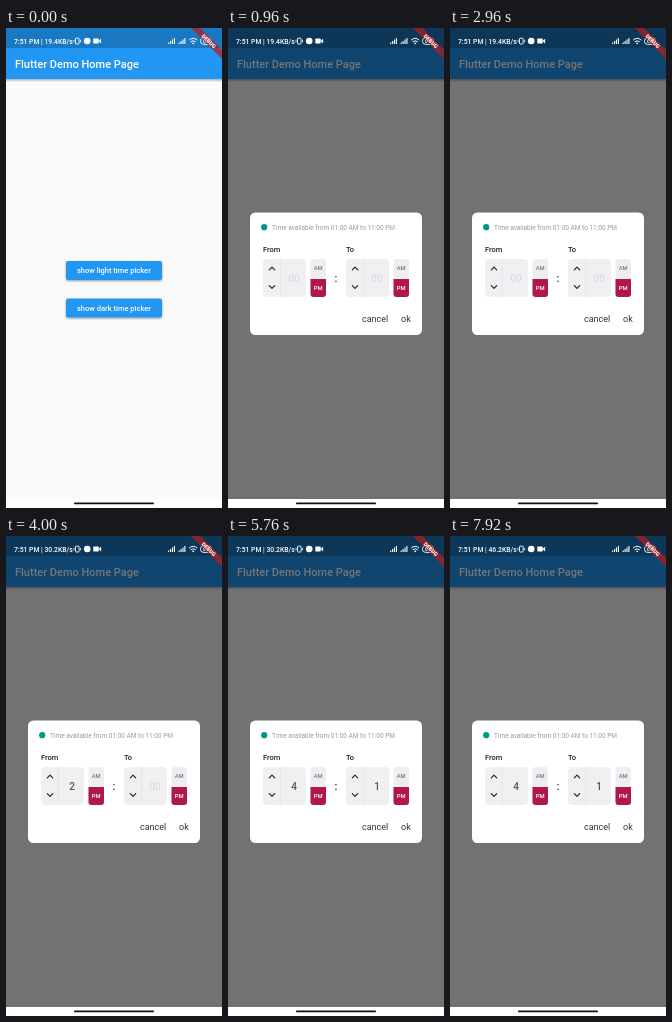
An HTML page that plays this animation: 216 px wide and 480 px high, repeating every 8000 ms.

```html
<!DOCTYPE html>
<html lang="en">
<head>
<meta charset="utf-8">
<title>Time range picker</title>
<style>
html, body { margin: 0; width: 100%; height: 100%; overflow: hidden; }
svg { display: block; width: 216px; height: 480px; font-family: Roboto, sans-serif; }
.line { fill: none; stroke-linecap: round; stroke-linejoin: round; }
.mid { text-anchor: middle; }
.medium { font-weight: 500; }
</style>
</head>
<body>
<svg viewBox="0 0 216 480">
  <defs>
    <linearGradient id="shade" x2="0" y2="1">
      <stop stop-opacity=".3"/><stop offset="1" stop-opacity="0"/>
    </linearGradient>
    <filter id="drop" x="-10%" y="-20%" width="120%" height="160%">
      <feDropShadow dx="0" dy="1" stdDeviation=".8" flood-opacity=".4"/>
    </filter>
    <g id="picker">
      <rect y="231" width="43" height="38" rx="4" fill="#f2eff3"/>
      <path d="M17.5 231v38" stroke="#e6e2e8" stroke-width=".8"/>
      <path class="line" d="M6.3 241.8l2.7-2.7 2.7 2.7M6.3 257.7l2.7 2.7 2.7-2.7" stroke="#222" stroke-width="1.2"/>
      <rect x="47.5" y="231" width="15.5" height="38" rx="3" fill="#efedf1"/>
      <path d="M47.5 251H63v15a3 3 0 0 1-3 3h-9.500a3 3 0 0 1-3-3z" fill="#b0174b"/>
      <g class="mid medium" font-size="5.8">
        <text x="55.200" y="242" fill="#777">AM</text>
        <text x="55.200" y="262" fill="#fff">PM</text>
      </g>
    </g>
    <g id="bars">
      <path d="M.7 16v-1.500M2.600 16v-3M4.500 16v-4.500M6.400 16v-6" stroke="#fff" stroke-width="1.100"/>
    </g>
  </defs>

  <rect width="216" height="480" fill="#fafafa"/>
  <rect y="51" width="216" height="3" fill="url(#shade)"/>
  <rect width="216" height="51" fill="#2196f3"/>
  <rect width="216" height="20" fill="#1a78c2"/>
  <text class="medium" x="9" y="40" font-size="11" fill="#fff">Flutter Demo Home Page</text>
  <g filter="url(#drop)" fill="#2196f3">
    <rect x="60" y="233" width="96" height="19" rx="2"/>
    <rect x="60" y="270.500" width="96" height="19" rx="2"/>
  </g>
  <g class="medium" font-size="7.500" fill="#fff">
    <text x="71" y="245.200">show light time picker</text>
    <text x="71" y="282.700">show dark time picker</text>
  </g>

  <g id="modal">
    <rect width="216" height="471" fill-opacity=".54"/>
    <rect x="22" y="184.500" width="172" height="122.500" rx="5.500" fill="#fff"/>
    <circle cx="36.200" cy="199.200" r="3.100" fill="#009688"/>
    <text x="44" y="201.500" font-size="6.500" fill="#999">Time available from 01:00 AM to 11:00 PM</text>
    <g class="medium" font-size="7.500" fill="#222">
      <text x="35" y="224">From</text>
      <text x="118" y="224">To</text>
    </g>
    <use href="#picker" x="35"/>
    <use href="#picker" x="118"/>
    <g class="mid medium" font-size="10">
      <text id="from" x="66" y="253.600"></text>
      <text id="to" x="149" y="253.600"></text>
      <text x="108" y="254" font-size="11" fill="#222">:</text>
    </g>
    <g font-size="9" fill="#333">
      <text x="134" y="294">cancel</text>
      <text x="173" y="294">ok</text>
    </g>
  </g>

  <rect y="471" width="216" height="9" fill="#fff"/>
  <rect x="68" y="474.500" width="80" height="1.800" rx=".9" fill="#111"/>

  <g fill="#fff">
    <text id="status" class="medium" x="8" y="15.500" font-size="6.800"></text>
    <rect x="69.500" y="10.200" width="3.600" height="5.800" rx=".6" fill="none" stroke="#fff" stroke-width=".9"/>
    <path d="M68 11.800v2.600M74.600 11.800v2.600" stroke="#fff" stroke-width=".8"/>
    <circle cx="81.200" cy="13" r="3.300"/>
    <rect x="87.300" y="10.600" width="5.400" height="5" rx=".7"/>
    <path d="M92.500 13l2.600-2.200v4.600z"/>
  </g>
  <use href="#bars" x="162"/>
  <use href="#bars" x="172.500"/>
  <path class="line" d="M183.500 11.800q3.700-3.200 7.400 0M185 13.600q2.200-1.900 4.400 0" stroke="#fff"/>
  <circle cx="187.200" cy="15.300" r=".9" fill="#fff"/>
  <rect x="194.500" y="9.800" width="11" height="6.600" rx="3" fill="none" stroke="#fff" stroke-width=".9"/>
  <text class="mid medium" x="200" y="15.200" font-size="5.500" fill="#fff">63</text>

  <g transform="translate(216 0) rotate(45)">
    <rect x="-22" y="15.400" width="44" height="6.600" fill="#b71c1c" fill-opacity=".7"/>
    <text class="mid" y="20.600" font-size="5.400" font-weight="900" fill="#fff">DEBUG</text>
  </g>
</svg>
<script>
const LOOP = 8000;
const el = id => document.getElementById(id);

// Each track lists [start time, value] pairs.
const speeds = [[0, "19.4"], [4000, "30.2"], [7200, "46.2"]];
const fromHours = [[0, "00"], [3280, "1"], [3680, "2"], [4080, "3"], [4480, "4"]];
const toHours = [[0, "00"], [5440, "1"], [6000, "2"], [7200, "1"]];

const valueAt = (track, t) => track.filter(([start]) => start <= t).pop()[1];

function setText(id, text) {
  if (el(id).textContent !== text) el(id).textContent = text;
}

function setHour(id, track, t) {
  const hour = valueAt(track, t);
  setText(id, hour);
  el(id).setAttribute("fill", hour === "00" ? "#dfdbe1" : "#555");
}

function draw(now) {
  const t = now % LOOP;
  const p = Math.min(1, Math.max(0, (t - 850) / 100));
  el("modal").setAttribute("opacity", 1 - (1 - p) ** 2);
  setText("status", `7:51 PM | ${valueAt(speeds, t)}KB/s`);
  setHour("from", fromHours, t);
  setHour("to", toHours, t);
  requestAnimationFrame(draw);
}

const begin = performance.now();
draw(0);
function tick() {
  return performance.now() - begin;
}
</script>
</body>
</html>
```
